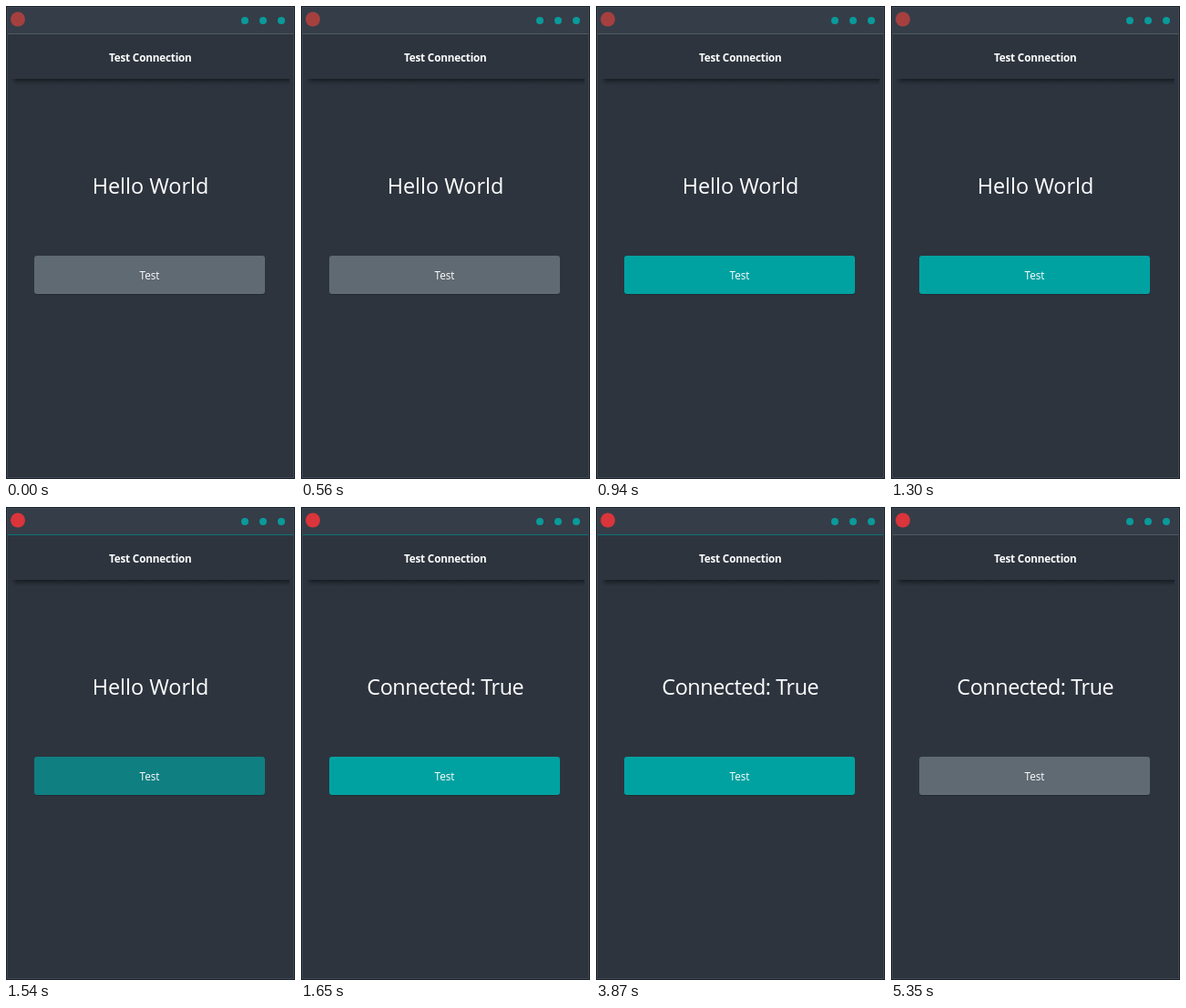
Write an HTML page that moves like this. It is 317 by 519 pixels and loops after 5720 ms.

```html
<!DOCTYPE html>
<html lang="en">
<head>
<meta charset="utf-8">
<title>Test Connection</title>
<style>
  html, body { margin: 0; width: 100%; height: 100%; overflow: hidden; background: #2d343e; }
  svg { display: block; width: 317px; height: 519px; }
  text { font-family: "Open Sans", "Noto Sans", sans-serif; fill: #fff; text-anchor: middle; }
  .title { font-size: 11.7px; font-weight: 700; letter-spacing: -.18px; }
  .label { font-size: 11.7px; }
  .big { font-size: 23.4px; }
  #done { letter-spacing: -.45px; }
</style>
</head>
<body>
<svg viewBox="0 0 317 519">
  <defs>
    <linearGradient id="fade" x1="0" y1="0" x2="0" y2="1">
      <stop offset="0" stop-color="#14181d" stop-opacity=".85"/>
      <stop offset=".4" stop-color="#14181d" stop-opacity=".4"/>
      <stop offset="1" stop-color="#14181d" stop-opacity="0"/>
    </linearGradient>
    <linearGradient id="edge">
      <stop offset="0" stop-color="#2d343e"/>
      <stop offset="1" stop-color="#2d343e" stop-opacity="0"/>
    </linearGradient>
  </defs>

  <rect width="317" height="519" fill="#2d343e"/>
  <rect width="317" height="30" fill="#353d48"/>
  <rect id="line" x="1" y="30" width="315" height="1" fill="#505a62"/>
  <rect x="1.5" y="1.5" width="314" height="516" fill="none" stroke="#3d4751"/>
  <rect x=".5" y=".5" width="316" height="518" fill="none" stroke="#1b242c"/>

  <circle id="icon" cx="13" cy="14.5" r="8" fill="#a5403f"/>
  <g fill="#0a9a9b">
    <circle cx="262" cy="16" r="4"/>
    <circle cx="282" cy="16" r="4"/>
    <circle cx="302" cy="16" r="4"/>
  </g>

  <rect x="5" y="80" width="306" height="7" fill="url(#fade)"/>
  <rect x="5" y="80" width="7" height="7" fill="url(#edge)"/>
  <text class="title" x="158.3" y="61">Test Connection</text>

  <text id="hello" class="big" x="158.5" y="206">Hello World</text>
  <text id="done" class="big" x="158.3" y="206" opacity="0">Connected: True</text>

  <rect x="31" y="275" width="253" height="42" rx="3" fill="#222932"/>
  <rect id="button" x="31" y="274" width="253" height="42" rx="3" fill="#5f6a72"/>
  <text class="label" x="157.5" y="300">Test</text>
</svg>
<script>
  const LOOP = 5720;
  const GREY = '#5f6a72', TEAL = '#00a2a1', PRESSED = '#0f7f82';

  // Each track lists [time in ms, value]; values hold until the next entry.
  const tracks = [
    ['button', 'fill', [[0, GREY], [940, TEAL], [1540, PRESSED], [1650, TEAL], [5350, GREY]]],
    ['line', 'fill', [[0, '#505a62'], [1540, '#0b7477'], [5350, '#505a62']]],
    ['icon', 'fill', [[0, '#a5403f'], [1540, '#d9353b']]],
    ['hello', 'opacity', [[0, 1], [1650, 0]]],
    ['done', 'opacity', [[0, 0], [1650, 1]]],
  ];

  for (const [id, prop, steps] of tracks) {
    const frames = steps.map(([time, value]) => ({ offset: time / LOOP, [prop]: value, easing: 'step-end' }));
    frames.push({ offset: 1, [prop]: steps.at(-1)[1] });
    const anim = document.getElementById(id).animate(frames, { duration: LOOP, iterations: Infinity });
    anim.startTime = 0;
  }
</script>
</body>
</html>
```
